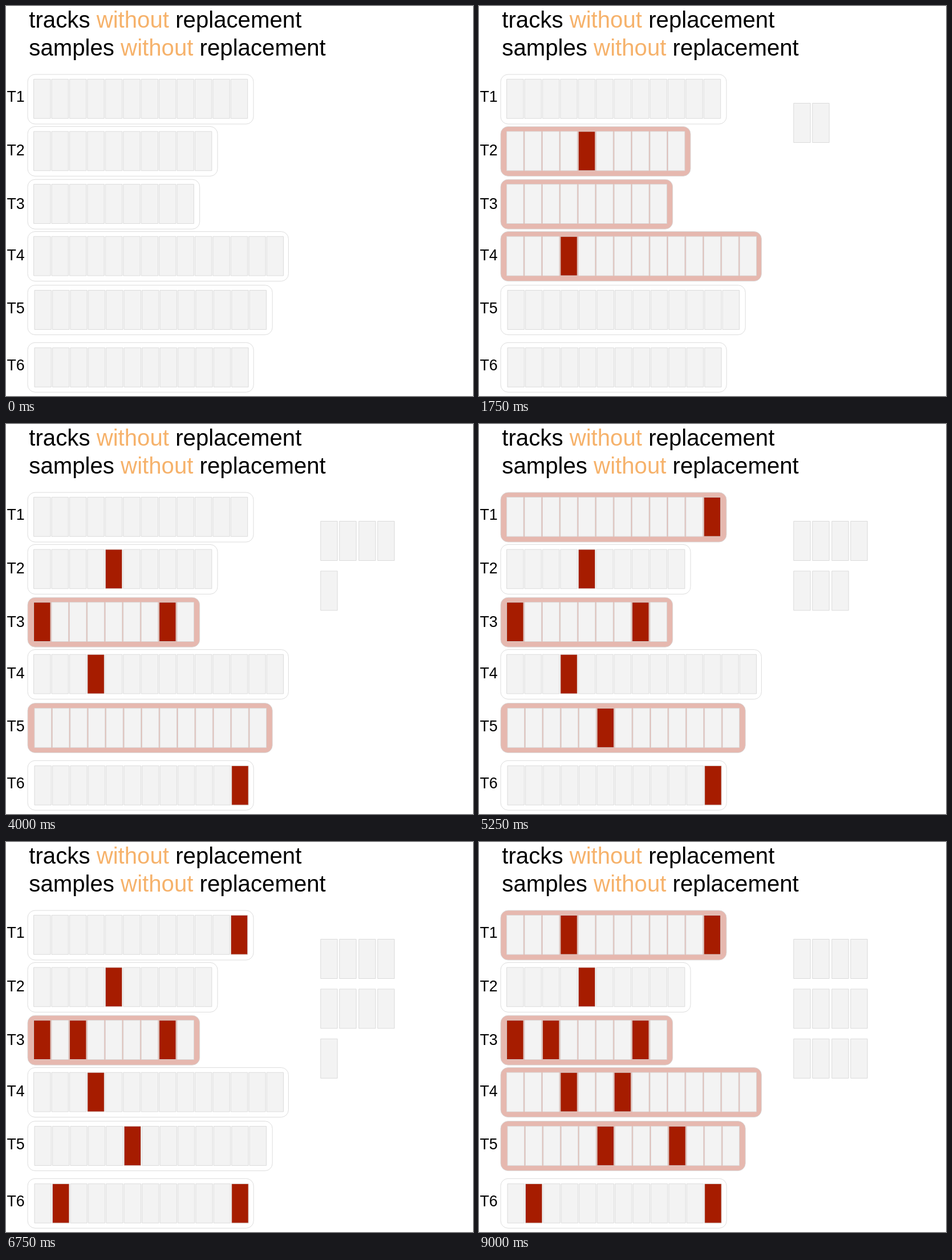
An HTML page with a canvas for the animation above (9.25 s loop, 819 px wide and 684 px high).

```html
<!DOCTYPE html>
<html lang="en">
<head>
<meta charset="utf-8">
<title>Track sampling</title>
<style>
html, body { margin: 0; width: 100%; height: 100%; overflow: hidden; background: #fff; }
canvas { display: block; }
</style>
</head>
<body>
<canvas id="stage" width="819" height="684"></canvas>
<script>
const ctx = document.getElementById('stage').getContext('2d');
const FONT = '"Liberation Sans", Arial, sans-serif';
const STEP = 250;
const GREY = '#f3f3f3', LINE = '#d9d9d9', RED = '#a61c00', PINK = '#e6b8af', ORANGE = '#f6b26b';
const PITCH = 31.43, BATCH = 4;

// y and right edge of the frame, first cell x and y, cell count, label baseline
const tracks = [
  { y: 120, right: 434, x: 48.6, top: 128.4, n: 12, base: 168 },
  { y: 211.4, right: 371, x: 48.6, top: 220, n: 10, base: 262 },
  { y: 304.2, right: 339.7, x: 48.6, top: 312.7, n: 9, base: 355.5 },
  { y: 395.6, right: 495.4, x: 48.6, top: 404.2, n: 14, base: 446 },
  { y: 489.6, right: 467.2, x: 50, top: 498.6, n: 13, base: 538.5 },
  { y: 590.3, right: 434.2, x: 50, top: 599.4, n: 12, base: 639 }
];

// [track, cell] in drawing order; every four draws form one batch
const draws = [
  [3, 3], [1, 4], [2, 0], [5, 11],
  [2, 7], [4, 5], [0, 11], [5, 1],
  [2, 2], [0, 3], [4, 9], [3, 6]
];
const STEPS = draws.length * 3 + 1;

function text(str, x, y, size, color = '#000') {
  ctx.font = `${size}px ${FONT}`;
  ctx.fillStyle = color;
  ctx.fillText(str, x, y);
  return x + ctx.measureText(str).width;
}

function heading(noun, y) {
  let x = text(noun + ' ', 40.3, y, 40.2);
  x = text('without', x, y, 40.2, ORANGE);
  text(' replacement', x, y, 40.2);
}

function box(x, y, w, h, fill, r = 0) {
  ctx.beginPath();
  ctx.roundRect(x, y, w, h, r);
  ctx.fillStyle = fill;
  ctx.fill();
  ctx.stroke();
}

function render(step) {
  ctx.fillStyle = '#fff';
  ctx.fillRect(0, 0, 819, 684);
  ctx.strokeStyle = LINE;
  ctx.lineWidth = 0.9;
  heading('tracks', 38);
  heading('samples', 87);

  // each draw takes three steps: track, cell, slot
  const batch = Math.floor((step - 1) / 3 / BATCH);
  const active = draws.map((d, i) => step > i * 3 && Math.floor(i / BATCH) === batch ? d[0] : -1);
  const picked = draws.filter((d, i) => step >= i * 3 + 2);

  tracks.forEach((t, k) => {
    text('T' + (k + 1), 1.4, t.base, 26.8);
    box(38, t.y, t.right - 38, 87, active.includes(k) ? PINK : '#fff', 13);
    for (let c = 0; c < t.n; c++) {
      const hit = picked.some(p => p[0] === k && p[1] === c);
      box(t.x + c * PITCH, t.top, 29.4, 68.8, hit ? RED : GREY);
    }
  });

  for (let i = 0; i < Math.floor(step / 3); i++) {
    const x = Math.round(552 + (i % BATCH) * 33.4) - 0.2;
    const y = 170.5 + Math.floor(i / BATCH) * 87.4;
    box(x, y, 29.4, 69, GREY);
  }
}

const start = performance.now();
let shown = -1;
function tick() {
  const step = Math.floor((performance.now() - start) / STEP) % STEPS;
  if (step !== shown) render(shown = step);
  requestAnimationFrame(tick);
}
tick();
</script>
</body>
</html>
```
